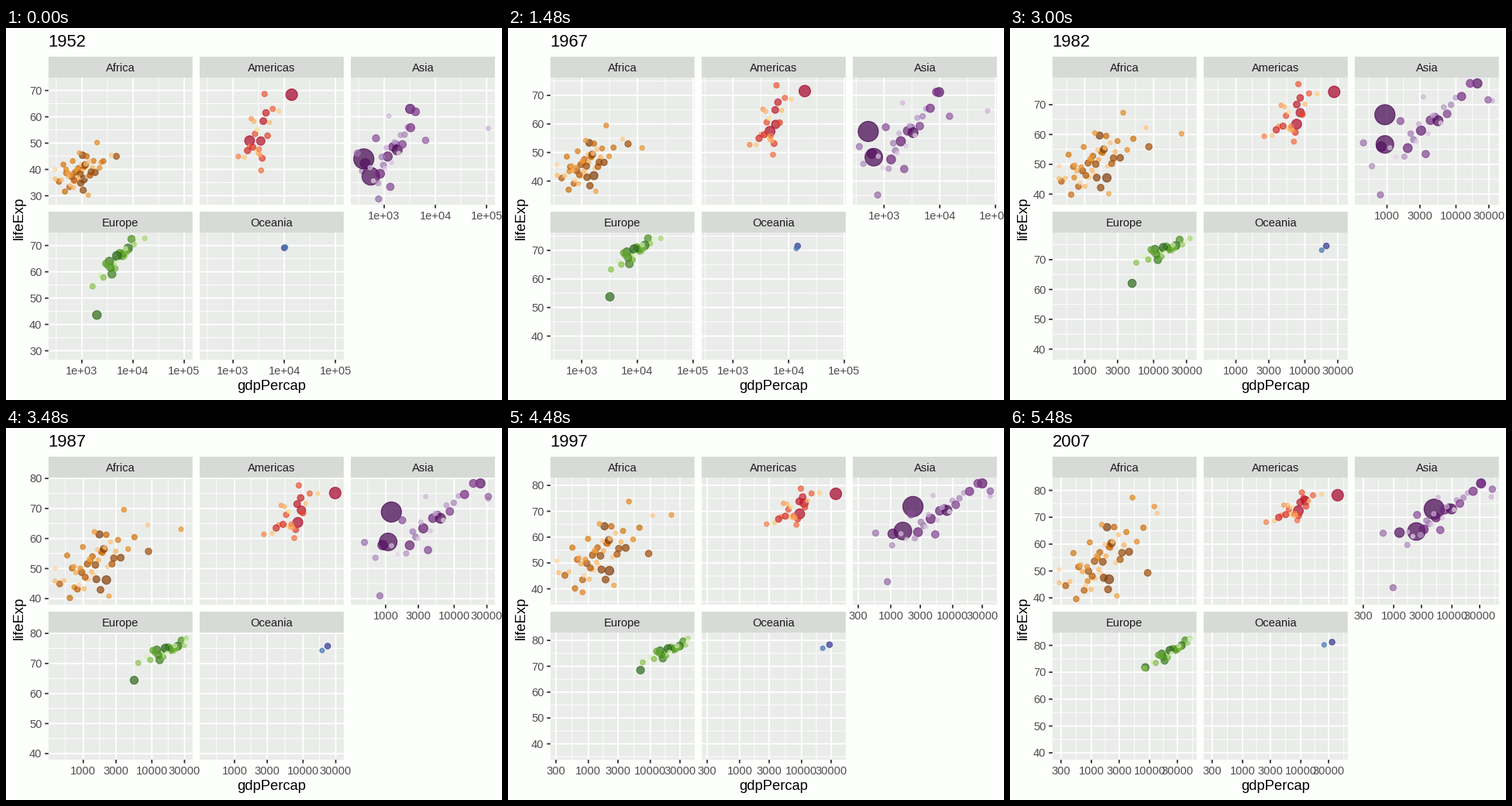
Recreate the animation shown at these times as a matplotlib script. Size 640 by 480 pixels, loop 6 s.

```python
import numpy as np
import matplotlib.pyplot as plt
from matplotlib.animation import ArtistAnimation
from matplotlib.collections import LineCollection
from matplotlib.colors import LinearSegmentedColormap
from matplotlib.patches import Rectangle

W, H, DPI = 640, 480, 100
PT = 72 / DPI                      # points per pixel
TICK_MS, LOOP_MS, STEPS = 40, 6000, 12
FIRST_YEAR, MID_YEAR, LAST_YEAR = 1952, 1977, 2007
PANEL_W, PANEL_H, STRIP_H = 185.9, 164, 27
COLS, ROWS = (54.8, 249.9, 444.9), (64, 264)

plt.rcParams["font.family"] = "Liberation Sans"
plt.rcParams["path.snap"] = False


def curve(keys, year):
    """Parabola through the values at the first, middle and last year."""
    start, mid, end = keys
    u = (year - FIRST_YEAR) / (LAST_YEAR - FIRST_YEAR)
    m = (MID_YEAR - FIRST_YEAR) / (LAST_YEAR - FIRST_YEAR)
    bulge = (mid - start - (end - start) * m) / (m * (1 - m))
    return start + (end - start) * u + bulge * u * (1 - u)


def keyed(points):
    """Straight runs between a few (year, value) points."""
    years, values = zip(*points.items())
    return lambda year: np.interp(year, years, values)


# Edges of the data, which set the axes
GDP_LOW = keyed({1952: 299, 1962: 355, 1977: 371, 1982: 424, 1997: 312, 2002: 241, 2007: 278})
GDP_HIGH = keyed({1952: 108400, 1957: 113500, 1967: 80900, 1972: 109300,
                  1977: 59300, 1982: 33700, 1987: 31500, 2007: 49400})
LIFE_LOW = keyed({1952: 28.8, 1972: 35.4, 1977: 31.2, 1982: 38.4, 1987: 39.9,
                  1992: 23.6, 1997: 36.1, 2002: 39.2, 2007: 39.6})
LIFE_HIGH = keyed({1952: 72.7, 1972: 74.7, 2002: 82, 2007: 82.6})


def data_range(year):
    return np.log10([GDP_LOW(year), GDP_HIGH(year)]), [LIFE_LOW(year), LIFE_HIGH(year)]


class Swarm:
    """Seeded dots around a moving centre; richer dots tend to live longer."""

    def __init__(self, seed, count, biggest, gdp, spread, life, tilt, noise):
        rng = np.random.default_rng(seed)
        q = (np.arange(count) + .5) / count
        bell = np.log(q / (1 - q)) / 1.9
        self.wealth, self.health = rng.permutation(bell), rng.permutation(bell)
        self.pop = .5 + biggest * rng.permutation(q) ** 3
        self.keys = gdp, spread, life, tilt, noise

    def at(self, year):
        gdp, spread, life, tilt, noise = (curve(k, year) for k in self.keys)
        return gdp + spread * self.wealth, life + tilt * self.wealth + noise * self.health


class Continent:
    """A panel of dots: a few landmarks (population, gdp keys, life keys) and a swarm.

    A crisis (year, depth, width) pulls the first landmark down for a while."""

    def __init__(self, name, col, row, colors, landmarks, swarm=None,
                 start_size=1, crisis=None):
        self.name, self.x, self.y = name, COLS[col], ROWS[row]
        self.landmarks, self.swarm = landmarks, swarm
        self.start_size, self.crisis = start_size, crisis
        self.pop = np.array([pop for pop, _, _ in landmarks])
        if swarm:
            self.pop = np.append(self.pop, swarm.pop)
        rank = np.argsort(np.argsort(-self.pop))
        ramp = LinearSegmentedColormap.from_list(name, colors)
        self.colors = ramp(rank / (len(rank) - 1), alpha=.7)

    def at(self, year):
        gdp = np.array([curve(np.log10(g), year) for _, g, _ in self.landmarks])
        life = np.array([curve(v, year) for _, _, v in self.landmarks])
        if self.crisis:
            when, depth, width = self.crisis
            life[0] -= depth * np.exp(-((year - when) / width) ** 2)
        if self.swarm:
            more_gdp, more_life = self.swarm.at(year)
            gdp, life = np.append(gdp, more_gdp), np.append(life, more_life)
        gdp_range, life_range = data_range(year)
        size = np.interp(year, [FIRST_YEAR, LAST_YEAR], [self.start_size, 1])
        radius = .59 + 1.778 * (1 + 6 * np.sqrt(self.pop * size / 1319))
        return np.clip(gdp, *gdp_range), np.clip(life, *life_range), radius


CONTINENTS = [
    Continent(
        "Africa", 0, 0, ["#7F3B08", "#B35806", "#E08214", "#FDB863", "#FDD5A5"],
        [(9, (493, 670, 863), (40, 45, 46.2)),
         (135, (1077, 1982, 2014), (36.3, 44.5, 46.9)),
         (44, (4725, 8028, 9270), (45, 55.5, 49.3)),
         (6, (2388, 21951, 12057), (42.7, 57.4, 74))],
        Swarm(5, 48, 70, gdp=(2.95, 3.12, 3.17), spread=(.26, .3, .4),
              life=(39, 49.5, 54.5), tilt=(1.2, 2.5, 4.5), noise=(4, 5, 7)),
        start_size=.6, crisis=(1993, 21, 4)),
    Continent(
        "Americas", 1, 0, ["#A50026", "#D73027", "#F46D43", "#FDAE61", "#FEE090"],
        [(301, (13990, 24073, 42952), (68.4, 73.4, 78.2)),
         (190, (2109, 6660, 9066), (50.9, 61.5, 72.4)),
         (109, (3478, 7675, 11978), (50.8, 65, 76.2))],
        Swarm(8, 22, 50, gdp=(3.5, 3.76, 3.88), spread=(.2, .19, .24),
              life=(52.5, 64, 73), tilt=(4, 3.5, 2.5), noise=(7, 5, 2.4))),
    Continent(
        "Asia", 2, 0, ["#40004B", "#762A83", "#9970AB", "#C2A5CF", "#E7D4E8"],
        [(14, (368, 525, 1714), (39.4, 50, 59.7)),
         (1319, (400, 741, 4959), (44, 64, 73)),
         (950, (547, 813, 2452), (37.4, 54.2, 64.7)),
         (150, (3217, 16610, 31656), (63, 75.4, 82.6)),
         (2.5, (108382, 59265, 47307), (55.6, 69.3, 77.6)),
         (32, (779, 786, 975), (28.8, 38.4, 43.8))],
        Swarm(3, 27, 200, gdp=(3.12, 3.5, 3.8), spread=(.33, .42, .47),
              life=(47, 61, 71.5), tilt=(3.5, 5, 5), noise=(6.5, 5, 3)),
        crisis=(1977, 19, 3.5)),
    Continent(
        "Europe", 0, 1, ["#276419", "#4D9221", "#7FBC41", "#B8E186", "#E6F5D0"],
        [(71, (1969, 4269, 8458), (43.6, 59.5, 71.8))],
        Swarm(4, 29, 80, gdp=(3.72, 4.11, 4.38), spread=(.24, .2, .22),
              life=(65.3, 72.2, 77.8), tilt=(4.2, 1.6, 2.5), noise=(1.8, 1.3, 1)),
        start_size=1.7),
    Continent(
        "Oceania", 1, 1, ["#313695", "#4575B4"],
        [(20, (10040, 18334, 34435), (69.1, 73.5, 81.2)),
         (4.1, (10557, 16234, 25185), (69.4, 72.2, 80.2))]),
]

fig = plt.figure(figsize=(W / DPI, H / DPI), dpi=DPI, facecolor="#FDFFFC")
ax = fig.add_axes([0, 0, 1, 1])
ax.set_axis_off()


def label(x, y, text, size=14.67, color="#4D4D4D", ha="center", **kw):
    return ax.text(x, y, text, fontsize=size * PT, color=color, ha=ha,
                   va="baseline", **kw)


def strokes(segments, width, color="white"):
    return ax.add_collection(
        LineCollection(segments, linewidths=width * PT, colors=color,
                       capstyle="butt", zorder=1), autolim=False)


def box(x, y, w, h, color):
    return ax.add_patch(Rectangle((x, y), w, h, facecolor=color, lw=0, zorder=0))


def draw_fixed_parts():
    for c in CONTINENTS:
        c.panel = box(c.x, c.y, PANEL_W, PANEL_H, "#EAECEA")
        box(c.x, c.y - STRIP_H, PANEL_W, STRIP_H, "#D8DAD8")
        label(c.x + PANEL_W / 2, c.y - 7.8, c.name, color="#1A1A1A")
    label(342.5, 467, "gdpPercap", 18.33, "black")
    label(21.7, 245.5, "lifeExp", 18.33, "black", rotation=90, rotation_mode="anchor")


def spaced(low, high, pixels):
    """Map a data range, padded by 5 % on each side, to pixels."""
    return lambda v: (np.asarray(v) - low + .05 * (high - low)) / (high - low) / 1.1 * pixels


def midpoints(values):
    return [(a + b) / 2 for a, b in zip(values, values[1:])]


def inside(position, values, size):
    return [v for v in values if 0 <= position(v) <= size]


def gdp_breaks(year):
    if year < MID_YEAR:
        return {float(n): f"1e+0{n}" for n in range(2, 7)}
    values = [k * 10 ** n for n in range(2, 6) for k in (1, 3)]
    return {np.log10(v): str(v) for v in values}


def scene(year):
    gdp_range, life_range = data_range(year)
    to_x, to_up = spaced(*gdp_range, PANEL_W), spaced(*life_range, PANEL_H)
    names = gdp_breaks(year)
    decades = range(0, 101, 20 if np.ptp(life_range) > 50 else 10)
    x_major = inside(to_x, names, PANEL_W)
    x_minor = inside(to_x, midpoints(list(names)), PANEL_W)
    y_major = inside(to_up, decades, PANEL_H)
    y_minor = inside(to_up, midpoints(decades), PANEL_H)

    def grid(c, xs, ys):
        bottom = c.y + PANEL_H
        return ([[(c.x + to_x(v), c.y), (c.x + to_x(v), bottom)] for v in xs]
                + [[(c.x, bottom - to_up(v)), (c.x + PANEL_W, bottom - to_up(v))] for v in ys])

    art = [label(54.8, 24.3, str(year), 22, "black", "left")]
    ticks = []
    for c in CONTINENTS:
        bottom = c.y + PANEL_H
        art += [strokes(grid(c, x_minor, y_minor), .89),
                strokes(grid(c, x_major, y_major), 1.78)]
        gdp, life, radius = c.at(year)
        dots = ax.scatter(c.x + to_x(gdp), bottom - to_up(life),
                          s=(2 * radius * PT) ** 2, facecolors=c.colors,
                          edgecolors=c.colors, linewidths=1.18 * PT, zorder=2)
        dots.set_clip_path(c.panel)
        art.append(dots)
        if c.name not in ("Africa", "Americas"):
            for v in x_major:
                x = c.x + to_x(v)
                ticks.append([(x, bottom), (x, bottom + 4.6)])
                art.append(label(x, bottom + 18.9, names[v]))
        if c.x == COLS[0]:
            for v in y_major:
                y = bottom - to_up(v)
                ticks.append([(c.x - 4.6, y), (c.x, y)])
                art.append(label(46.5, y + 5.2, str(v), ha="right"))
    art.append(strokes(ticks, 1.78, "#333333"))
    return art


draw_fixed_parts()
scenes = [scene(FIRST_YEAR + 5 * step) for step in range(STEPS)]
ax.set(xlim=(0, W), ylim=(H, 0))
sequence = [scenes[(TICK_MS * i + TICK_MS // 2) * STEPS // LOOP_MS]
            for i in range(LOOP_MS // TICK_MS)]
animation = ArtistAnimation(fig, sequence, interval=TICK_MS, repeat=True, repeat_delay=0)
plt.show()
```
